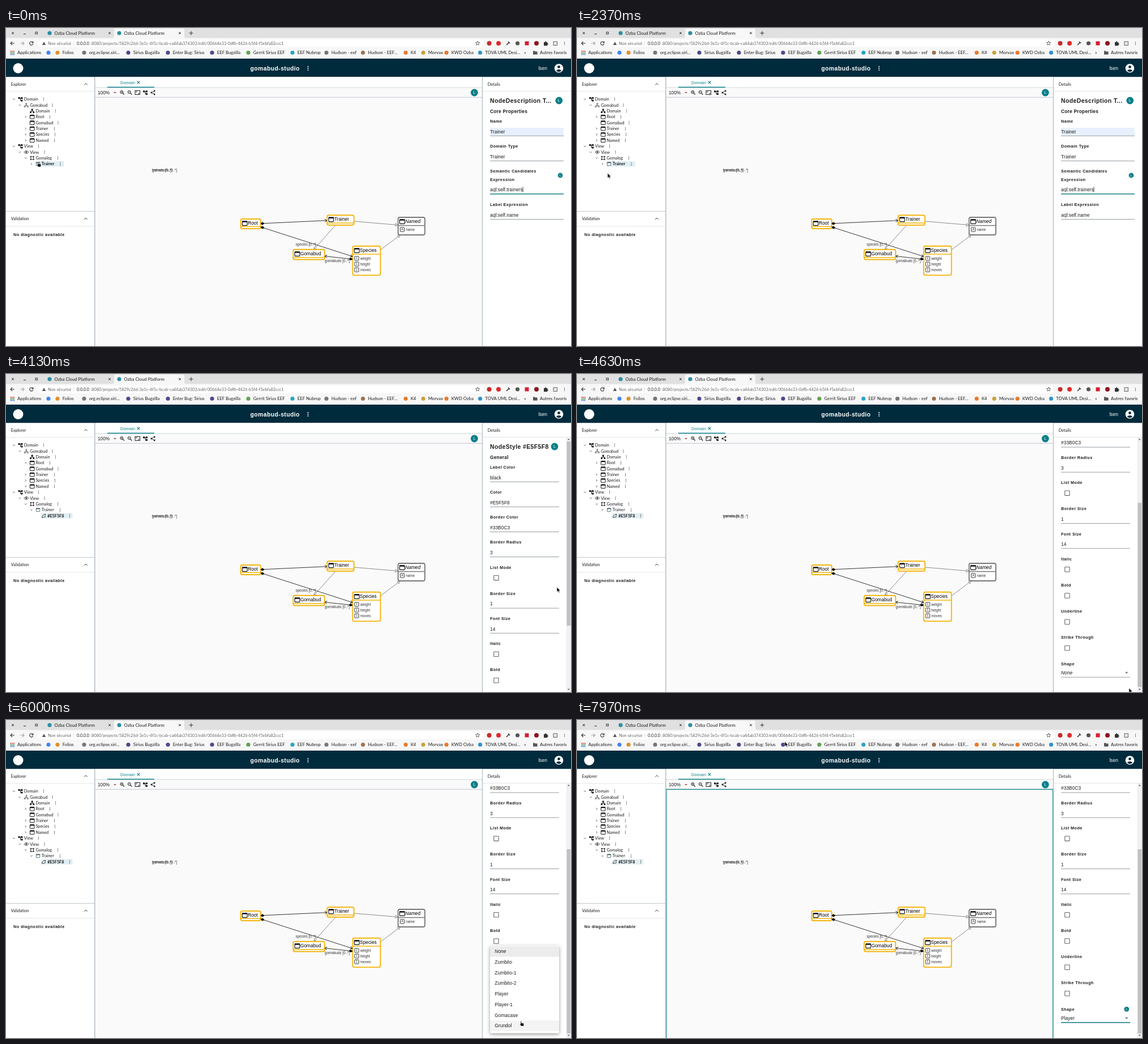
An HTML page for the animation above (8 s loop, 998 by 561 pixels).

```html
<!DOCTYPE html>
<html lang="en">
<head>
<meta charset="utf-8">
<title>Modeling studio</title>
<style>
html, body { margin: 0; width: 100%; height: 100%; overflow: hidden; background: #fff; }
svg { display: block; width: 100vw; height: 100vh; }
text { white-space: pre; }
.l { font-family: Lato, "Open Sans", sans-serif; }
.a { font-family: "Liberation Sans", Arial, sans-serif; }
</style>
</head>
<body>
<svg id="stage" viewBox="0 0 998 561" xmlns="http://www.w3.org/2000/svg"></svg>
<script>
const TEAL = '#0b7f88', NAVY = '#002b3c', AMBER = '#f3b50c', INK = '#1c1c1c';

// Drawing helpers; text is placed by its vertical centre.
const esc = s => s.replace(/&/g, '&amp;').replace(/</g, '&lt;');
const text = (x, y, s, size = 7.28, o = {}) =>
  `<text class="${o.f || 'a'}" x="${x}" y="${y + size * .35}" font-size="${size}" fill="${o.c || INK}"` +
  `${o.b ? ' font-weight="700"' : ''}${o.i ? ' font-style="italic"' : ''}` +
  `${o.ls ? ` letter-spacing="${o.ls}"` : ''}${o.m ? ' text-anchor="middle"' : ''}>${esc(s)}</text>`;
const lato = (x, y, s, size = 7.28, o = {}) => text(x, y, s, size, { f: 'l', ...o });
const rect = (x, y, w, h, fill, extra = '') =>
  `<rect x="${x}" y="${y}" width="${w}" height="${h}" fill="${fill}" ${extra}/>`;
const disc = (x, y, r, fill, extra = '') => `<circle cx="${x}" cy="${y}" r="${r}" fill="${fill}" ${extra}/>`;
const path = (d, stroke = INK, w = 1, fill = 'none', extra = '') =>
  `<path d="${d}" stroke="${stroke}" stroke-width="${w}" fill="${fill}" ${extra}/>`;
const at = (x, y, s) => `<g transform="translate(${x} ${y})">${s}</g>`;
const group = (id, s, extra = '') => `<g id="${id}" ${extra}>${s}</g>`;
const dots = (x, y, c = '#333', r = .65, gap = 2.2) =>
  [-1, 0, 1].map(k => disc(x, y + k * gap, r, c)).join('');
const cross = (x, y, r, c = '#333', w = 1) =>
  path(`M${x - r} ${y - r}l${2 * r} ${2 * r}m0 ${-2 * r}l${-2 * r} ${2 * r}`, c, w);
const badge = (x, y, r, size) => disc(x, y, r, TEAL) + text(x, y, 'L', size, { c: '#fff', m: 1 });
const chevUp = (x, y) => path(`M${x - 2.8} ${y + 1.4}l2.8 -2.8 2.8 2.8`, '#333', 1);

const icons = {
  tree: path('M-1 -2h2M0 -2v4.5h1', INK, .9) + rect(-4, -3.6, 3.2, 3, INK) + rect(.8, -3.6, 3.2, 3, INK) + rect(.8, .9, 3.2, 3, INK),
  model: path('M0 -1v2M-2.6 2v-1h5.2v1', '#333', .8) + [[0, -2.3], [-2.6, 2.6], [2.6, 2.6]].map(p => disc(p[0], p[1], 1.1, '#fff', 'stroke="#333" stroke-width=".8"')).join(''),
  domain: path('M0 -1v2M-2.8 2v-1.6h5.6v1.6', INK, .8) + rect(-1.5, -3.8, 3, 3, INK) + rect(-4, 1, 2.8, 2.8, INK) + rect(1.2, 1, 2.8, 2.8, INK),
  type: rect(-3.8, -3.2, 7.6, 6.6, '#fff', 'rx=".7" stroke="#111" stroke-width="1"') + rect(-3.8, -3.4, 7.6, 1.9, '#111'),
  node: rect(-3.2, -2.9, 6.4, 5.8, '#fff', 'rx=".6" stroke="#38555f" stroke-width=".8"') + rect(-3.2, -2.9, 6.4, 1.4, '#38555f'),
  eye: path('M-4 0Q0 -5 4 0Q0 5 -4 0Z', '#333', .9) + disc(0, 0, 1.4, '#333'),
  diagram: path('M-2.4 -2.4h4.8v4.8h-4.8z', '#333', .8) + [[-2.4, -2.4], [2.4, -2.4], [-2.4, 2.4], [2.4, 2.4]].map(p => rect(p[0] - 1.1, p[1] - 1.1, 2.2, 2.2, '#333')).join(''),
  style: path('M-3.4 3C-3 -.5 -1 -2.8 3 -2.8L1.8 .6 2.8 1.6C.5 3 -1.5 2.6 -3.4 3Z', '#333', .9)
};

function browser() {
  let s = rect(0, 0, 998, 18, '#e0e0e0') + rect(0, 17.5, 998, 36.5, '#f7f7f7') +
    path('M187 18Q191 18 191 14V4Q191 1 194 1H312Q315 1 315 4V14Q315 18 319 18Z', 'none', 0, '#f7f7f7');
  s += cross(12, 9, 2) + rect(31, 10, 4, 1.1, '#333') + rect(52, 7.2, 3.4, 3.4, 'none', 'stroke="#333"');
  for (const [x, close] of [[77, 183], [200, 307]])
    s += disc(x, 9, 3.6, '#2b8fa3') + lato(x + 8.5, 9, 'Ozba Cloud Platform', 7.8) + cross(close, 9, 1.9);
  s += path('M323.5 9h7M327 5.5v7', '#333', 1);
  s += path('M15 27h-7m3 -3l-3 3 3 3', '#333', 1.1) + path('M25 27h7m-3 -3l3 3 -3 3', '#a5a5a5', 1.1) +
    path('M47.2 25A3.1 3.1 0 1 0 47.8 28M48 23.5v2.6h-2.6', '#333', 1.1);
  s += rect(56, 20.5, 788, 13, '#fff', 'rx="6.5"') + path('M63.8 30h6.4L67 24.2Z', 'none', 0, '#555') +
    lato(74, 27, 'Non sécurisé', 7.28, { c: '#666' }) + rect(119.5, 23, .6, 8, '#ccc') +
    lato(125, 27, '0.0.0.0', 7.28) +
    lato(149.5, 27, ':8080/projects/5829c26d-3e1c-4f1c-bcab-ca44ab374303/edit/00664e33-0dfb-4426-b5f4-f5ebfa82ccc1', 7.28, { c: '#666' });
  const star = Array.from({ length: 10 }, (_, k) => {
    const r = k % 2 ? 1.7 : 3.9, q = k * Math.PI / 5;
    return `${833 + r * Math.sin(q)} ${27 - r * Math.cos(q)}`;
  }).join('L');
  s += path(`M${star}Z`, '#444', .8);
  s += disc(853.5, 27, 4, '#c92a2a') + disc(870, 27, 4, '#dd2c2c') +
    path('M884 30l4.5 -4.5M887 24l3 3', '#333', 1.6) + disc(903.5, 27, 3.6, '#555') +
    rect(916.5, 23.5, 7, 7, '#d81e34') + disc(937, 27, 4, '#8e1520') +
    path('M950 25h2.2v-1.4h2v1.4h2.2v2.2h1.2v2h-1.2v2H950Z', 'none', 0, '#333') +
    rect(967, 24, 6.5, 6.5, '#e8e8e8', 'stroke="#555" stroke-width=".9"') + dots(986.5, 27);
  for (let k = 0; k < 9; k++)
    s += rect(7.6 + k % 3 * 2.7, 40.2 + (k / 3 | 0) * 2.7, 1.9, 1.9, ['#d94b3d', '#3b9c52', '#3d78d8'][k / 3 | 0]);
  s += lato(20, 43.5, 'Applications', 7.8) + disc(75, 43.5, 3.6, '#4285f4');
  const marks = [[91, 'Folios', '#e0912c'], [138, 'org.eclipse.siri…', '#777'], [216, 'Sirius Bugzilla', '#4b4a8c'],
    [286, 'Enter Bug: Sirius', '#4b4a8c'], [364, 'EEF Bugzilla', '#4b4a8c'], [428, 'Gerrit Sirius EEF', '#62a352'],
    [506, 'EEF Nubrop', '#29a3c4'], [566, 'Hudson - eef', '#777'], [630.5, 'Hudson - EEF…', '#9c7350'],
    [706, 'K4', '#e8792b'], [737, 'Morvax', '#c9a23a'], [778, 'KWD Ozba', '#e8792b'], [837.5, 'TOVA UML Desi…', '#2f91cf']];
  for (const [x, name, c] of marks) s += disc(x, 43.5, 3.6, c) + lato(x + 8.7, 43.5, name, 7.8);
  s += lato(915, 43, '»', 8) + path('M931 40.4h2.8l1 1.2h3.8v5.2H931Z', 'none', 0, '#555') + lato(943, 43.5, 'Autres favoris', 7.8);
  return s;
}

function header() {
  return rect(0, 54, 998, 32.5, NAVY) + disc(21.5, 71, 9, '#fff') +
    text(431.5, 71, 'gomabud-studio', 10.4, { b: 1, c: '#fff', ls: .43 }) + dots(533.5, 71, '#fff', 1, 3.1) +
    text(940.5, 71, 'lsen', 8.32, { c: '#fff' }) + disc(976.5, 71, 7.8, '#fff') +
    disc(976.5, 68.7, 2.4, NAVY) + path('M971.6 75.3Q976.5 70.6 981.4 75.3Q976.5 79.6 971.6 75.3Z', 'none', 0, NAVY);
}

// level, label, icon, toggle (1 open, 2 closed), x of the menu dots
const rows = [[0, 'Domain', 'tree', 1, 66.5], [1, 'Gomabud', 'model', 1, 82], [2, 'Domain', 'domain', 0, 87.5],
  [2, 'Root', 'type', 2, 77.5], [2, 'Gomabud', 'type', 0, 92], [2, 'Trainer', 'type', 2, 85.5],
  [2, 'Species', 'type', 2, 86.5], [2, 'Named', 'type', 2, 85.5], [0, 'View', 'tree', 1, 57.5],
  [1, 'View', 'eye', 1, 68], [2, 'Gomalog', 'diagram', 1, 91.5]];
const rowY = k => 125.6 + 10.38 * k;
const toggle = (x, y, open) =>
  path(open ? `M${x - 1.7} ${y - .8}l1.7 1.7 1.7 -1.7` : `M${x - .8} ${y - 1.7}l1.7 1.7 -1.7 1.7`, '#444', .9);
const row = (k, [lv, label, icon, tg, dx], bold) => {
  const y = rowY(k), x = 10.35 * lv;
  return (tg ? toggle(14 + x, y, tg === 1) : '') + at(25.5 + x, y, icons[icon]) +
    lato(31.8 + x, y, label, 7.28, { b: bold }) + dots(dx, y);
};

function explorer() {
  return rect(0, 86.5, 156, 475, '#fff') + lato(8.7, 99, 'Explorer') + chevUp(141, 99) +
    rect(0, 111.5, 156, .8, '#d9dfe2') + rect(0, 323, 156, .9, '#b9c4c9') + lato(8.7, 336.5, 'Validation') +
    chevUp(141, 336.5) + rect(0, 349.5, 156, .8, '#d9dfe2') +
    text(13, 364.5, 'No diagnostic available', 7.28, { b: 1, ls: .43 }) +
    rows.map((r, k) => row(k, r)).join('') +
    group('trainerPicked', rect(52.5, 235, 50, 9.6, '#e1eff3') + row(11, [3, 'Trainer', 'node', 0, 96], 1)) +
    group('trainerPlain', row(11, [3, 'Trainer', 'node', 0, 95.5])) +
    group('closed', toggle(45, rowY(11), false)) + group('opened', toggle(45, rowY(11), true)) +
    group('childPlain', row(12, [4, '#E5F5F8', 'style', 0, 110.5])) +
    group('childPicked', rect(62.5, 245.4, 55, 9.6, '#e1eff3') + row(12, [4, '#E5F5F8', 'style', 0, 112.5], 1));
}

const box = (x, y, w, h, split, label, o = {}) =>
  rect(x, y, w, h, '#fff', `rx="3" stroke="${o.c || AMBER}" stroke-width="1.9"`) +
  path(`M${x} ${split}h${w}`, o.c || AMBER, 1.5) + at(x + 7.2, o.ty + .4, `<g transform="scale(1.15)">${icons.type}</g>`) +
  text(x + 12.7, o.ty, label, 8.32, { i: o.i, c: '#000' });
const attr = (x, y, mark, name) =>
  rect(x - 3.6, y - 3.6, 7.2, 7.2, '#fff', 'rx=".7" stroke="#222" stroke-width=".9"') +
  text(x, y, mark, 5.5, { m: 1 }) + text(x + 6.2, y, name, 6.4, { c: '#333' });
function link(x1, y1, x2, y2, c, tip, diamond) {
  const deg = Math.atan2(y2 - y1, x2 - x1) * 180 / Math.PI, turn = `rotate(${deg})`;
  let s = path(`M${x1} ${y1}L${x2} ${y2}`, c, .85);
  if (diamond) s += at(x1, y1, path('M-3.6 0L0 -2.6 3.6 0 0 2.6Z', 'none', 0, '#000', `transform="${turn}"`));
  return s + at(x2, y2, path(tip ? 'M-4 -2.4L0 0 -4 2.4Z' : 'M-4 -2.6L0 0 -4 2.6', c, .85, tip ? '#fff' : 'none', `transform="${turn}"`));
}

function diagram() {
  const small = (x, y, s) => text(x, y, s, 6.3, { c: '#333' });
  const glass = (x, sign) => disc(x - .7, 113, 2.5, 'none', 'stroke="#222" stroke-width="1"') +
    path(`M${x + 1.2} 114.9l2.6 2.6`, '#222', 1.3) + path(`M${x - 2} 113h2.6${sign}`, '#222', .7);
  return rect(157.5, 86.5, 684, 475, '#fafafb') + rect(157.5, 86.5, 684, 18.5, '#fff') + rect(157.5, 104.6, 684, .8, '#c6ced2') +
    rect(179, 103.7, 83, 1.5, TEAL) + text(202, 96, 'Domain', 7.28, { c: TEAL, ls: .2 }) + cross(234, 96, 2.4, TEAL, 1.1) +
    rect(157.5, 121.8, 684, .9, '#b9c4c9') +
    text(162, 114, '100%', 8.32) + path('M190 113l2.5 2.6 2.5 -2.6Z', 'none', 0, '#a8503c') +
    glass(205, 'm-1.3 -1.3v2.6') + glass(218.5, '') + rect(228, 110.4, 8.6, 7, 'none', 'stroke="#222"') +
    path('M229.8 114v-2h2M234.8 114v2h-2', '#222', .8) + at(246, 114, icons.tree) +
    path('M262.2 111l-5.4 3 5.4 3', '#222', .9) + [[262.2, 111], [256.8, 114], [262.2, 117]].map(p => disc(p[0], p[1], 1.4, '#222')).join('') +
    badge(827.3, 114, 6.4, 7) +
    link(582, 348, 544, 390.5, '#777') + link(615, 341, 692, 347.5, '#777', 1) + link(662, 391, 696, 365.5, '#777', 1) +
    box(414.5, 337, 35.5, 17, 350.3, 'Root', { ty: 344 }) + box(567.2, 330.2, 47.4, 17.6, 344, 'Trainer', { ty: 337.3 }) +
    box(507.3, 390.7, 55.4, 17.8, 404.8, 'Gomabud', { ty: 398 }) + box(612.4, 384.7, 49, 51.4, 399, 'Species', { ty: 392 }) +
    box(692.6, 334, 47.2, 31, 348.6, 'Named', { c: '#777', i: 1, ty: 341 }) +
    attr(619.5, 406.5, '1', 'weight') + attr(619.5, 416.5, '1', 'height') + attr(619.5, 426.5, '1', 'moves') + attr(700, 355.5, 'A', 'name') +
    link(453, 344.8, 567, 339.6, '#111', 0, 1) + link(453, 352, 612, 403, '#111', 0, 1) + link(609, 407.5, 563, 402.5, '#111', 0, 1) +
    small(511.5, 382, 'species [0..*]') + small(563, 410.3, 'gomabuds [0..*]') +
    small(258, 250.8, 'gomabuds [0..*]') + small(258, 250.8, 'trainers [0..*]') +
    group('canvasFocus', path('M157.8 561V122.4H840.6V561', TEAL, 1.3));
}

const title = s => text(855, 128, s, 10.4, { b: 1, ls: .43 });
const section = s => text(855, 147.5, s, 8.32, { b: 1, ls: .25 });
const label = (y, s) => text(855, y, s, 7.28, { b: 1, ls: .43 });
const value = (y, s, o = {}) => text(855, y, s, 8.32, { ls: .08, ...o });
const rule = (y, w, c = '#8b9498', h = .9) => rect(855, y, w, h, c);

function nodePage() {
  return title('NodeDescription T...') + badge(976.8, 128, 6.4, 7) + section('Core Properties') +
    label(164.5, 'Name') + rect(855, 176, 130, 14, '#e8f0fe') + value(182.6, 'Trainer') + rule(189.8, 130) +
    label(208.7, 'Domain Type') + value(226.7, 'Trainer') + rule(234, 130) +
    label(252.8, 'Semantic Candidates') + label(267.3, 'Expression') + value(285.3, 'aql:self.trainers') + rule(292.3, 130) +
    group('fieldFocus', badge(979, 260, 4.4, 5) + rule(292, 130, TEAL, 1.4)) + group('caret', rect(912.6, 280.3, .8, 9.6, '#111')) +
    label(311.5, 'Label Expression') + value(329.6, 'aql:self.name') + rule(337, 130);
}

function stylePage() {
  const fields = [['Label Color', 'black'], ['Color', '#E5F5F8'], ['Border Color', '#33B0C3'], ['Border Radius', '3'], ['List Mode'],
    ['Border Size', '1'], ['Font Size', '14'], ['Italic'], ['Bold'], ['Underline'], ['Strike Through']];
  let y = 164.5, s = title('NodeStyle #E5F5F8') + badge(969, 128, 6.4, 7) + section('General');
  for (const [name, v] of fields) {
    s += label(y, name);
    s += v ? value(y + 18.2, v) + rule(y + 25.3, 122)
      : rect(861.7, y + 14.4, 8.4, 8.4, '#fff', 'rx=".8" stroke="#666" stroke-width="1.1"');
    y += v ? 44.15 : 46.25;
  }
  return s + label(660.6, 'Shape') + rule(684, 122) + path('M968 675.2l2.7 2.7 2.7 -2.7Z', 'none', 0, '#666') +
    group('shapeNone', value(676.4, 'None', { i: 1 })) +
    group('shapePlayer', value(676.4, 'Player') + rule(683.4, 122, TEAL, 1.4)) + group('shapeBadge', badge(970.8, 660.6, 4.4, 5));
}

const options = ['None', 'Zumbito', 'Zumbito-1', 'Zumbito-2', 'Player', 'Player-1', 'Gomacase', 'Grundol'];
const optionH = 18.72, menuTop = 398;
function menu() {
  return rect(855, menuTop, 122, 154.6, '#fff', 'rx="2" style="filter:drop-shadow(0 2px 3px #0006)"') +
    rect(855, 399, 122, optionH, '#ececec') + rect(855, 0, 122, optionH, '#f4f4f4', 'id="hover"') +
    options.map((s, k) => text(863.3, 408.4 + optionH * k, s, 8.32, { ls: .08, i: !k })).join('');
}

function details() {
  return rect(842, 86.5, 156, 475, '#fff') +
    `<clipPath id="pane"><rect x="842" y="112" width="156" height="449"/></clipPath><g clip-path="url(#pane)">` +
    group('nodePage', nodePage()) + group('stylePage', group('scroller', stylePage()) +
      rect(989.5, 111.5, 8.5, 450, '#f1f1f1') + rect(990.5, 119, 6.7, 325, '#c1c1c1', 'id="thumb"') +
      path('M991.8 116.2l2 -2.2 2 2.2Z', 'none', 0, '#555') + path('M991.8 555.5l2 2.2 2 -2.2Z', 'none', 0, '#555')) +
    '</g>' + lato(850.7, 99, 'Details') + rect(842, 111, 156, .8, '#d9dfe2') +
    rect(156, 86.5, 1.5, 475, '#b3bec4') + rect(840.8, 86.5, 1.3, 475, '#b3bec4');
}

document.getElementById('stage').innerHTML = browser() + header() + explorer() + diagram() + details() + group('menu', menu()) +
  group('arrow', path('M0 0V8.6L2 6.8 3.4 9.8 4.9 9.1 3.5 6.2H6.2Z', '#fff', .5, '#111')) +
  group('hand', path('M1 .2Q2.2 -.4 2.3 1V3.4L6 4.1Q7 4.4 6.8 5.8L6.2 9H2.2L-.4 6Q-.4 5 .9 5.3Z', '#fff', .5, '#111'));

const ui = {};
document.querySelectorAll('[id]').forEach(e => ui[e.id] = e);
const show = (id, on) => ui[id].setAttribute('visibility', on ? 'visible' : 'hidden');
const move = (id, x, y) => ui[id].setAttribute('transform', `translate(${x} ${y})`);

const T = { expand: 2900, pick: 3720, open: 5480, choose: 7190, focus: 7960 };
// time, x, y, hand pointer from here on
const track = [[0, 55, 236, 1], [30, 55, 236, 1], [260, 44, 247, 0], [560, 29, 252, 0], [870, 40, 241, 0], [970, 38, 243, 0],
  [1400, 38, 243, 0], [2200, 54, 256, 0], [2380, 54, 256, 0], [2670, 43, 237, 1], [2940, 43, 237, 1], [3530, 74, 247, 1],
  [3760, 74, 247, 0], [4130, 973, 376, 0], [4260, 991, 396, 0], [4300, 991, 400, 0], [4630, 975, 554, 0], [4800, 972, 554, 0],
  [5270, 930, 523, 1], [5480, 930, 523, 1], [6000, 908, 531, 1], [6300, 903, 534, 1], [7100, 893, 480, 1],
  [7230, 893, 480, 0], [7930, 367, 38, 0], [8000, 367, 38, 0]];
const clamp = v => Math.max(0, Math.min(1, v));
const ease = v => v * v * (3 - 2 * v);

function pointer(t) {
  let k = 0;
  while (k < track.length - 2 && t >= track[k + 1][0]) k++;
  const [t0, x0, y0, hand] = track[k], [t1, x1, y1] = track[k + 1], p = ease(clamp((t - t0) / (t1 - t0)));
  return { x: x0 + (x1 - x0) * p, y: y0 + (y1 - y0) * p, hand };
}

function scrollAt(t) {
  return t < 4640 ? 149.5 * ease(clamp((t - 4300) / 330)) : 149.5 + clamp((t - 4640) / 100);
}

function render(t) {
  const p = pointer(t), expanded = t >= T.expand, picked = t >= T.pick;
  show('arrow', !p.hand);
  show('hand', p.hand);
  move('arrow', p.x, p.y);
  move('hand', p.x, p.y);

  show('closed', !expanded);
  show('opened', expanded);
  show('trainerPicked', !picked);
  show('trainerPlain', picked);
  show('childPlain', expanded && !picked);
  show('childPicked', picked);

  ui.nodePage.style.display = picked ? 'none' : '';
  ui.stylePage.style.display = picked ? '' : 'none';
  show('fieldFocus', !expanded);
  show('caret', !expanded && (t + 100) % 1000 < 500);
  const y = scrollAt(t);
  move('scroller', 0, -y);
  move('thumb', 0, y * 109 / 150.5);

  const chosen = t >= T.choose;
  show('shapeNone', !chosen);
  show('shapePlayer', chosen);
  show('shapeBadge', t >= T.focus);
  show('canvasFocus', t >= T.focus);

  const grow = ease(clamp((t - T.open) / 220)), alpha = Math.min(grow, 1 - clamp((t - T.choose) / 160));
  ui.menu.style.display = alpha > 0 ? '' : 'none';
  ui.menu.setAttribute('opacity', alpha);
  ui.menu.setAttribute('transform', `translate(916 526) scale(${.8 + .2 * grow}) translate(-916 -526)`);
  const k = Math.floor((p.y - menuTop - 1) / optionH);
  show('hover', k > 0 && k < options.length);
  ui.hover.setAttribute('y', 399 + optionH * k);
}

const start = performance.now();
function tick() {
  render((performance.now() - start) % 8000);
  requestAnimationFrame(tick);
}
render(0);
requestAnimationFrame(tick);
</script>
</body>
</html>
```
